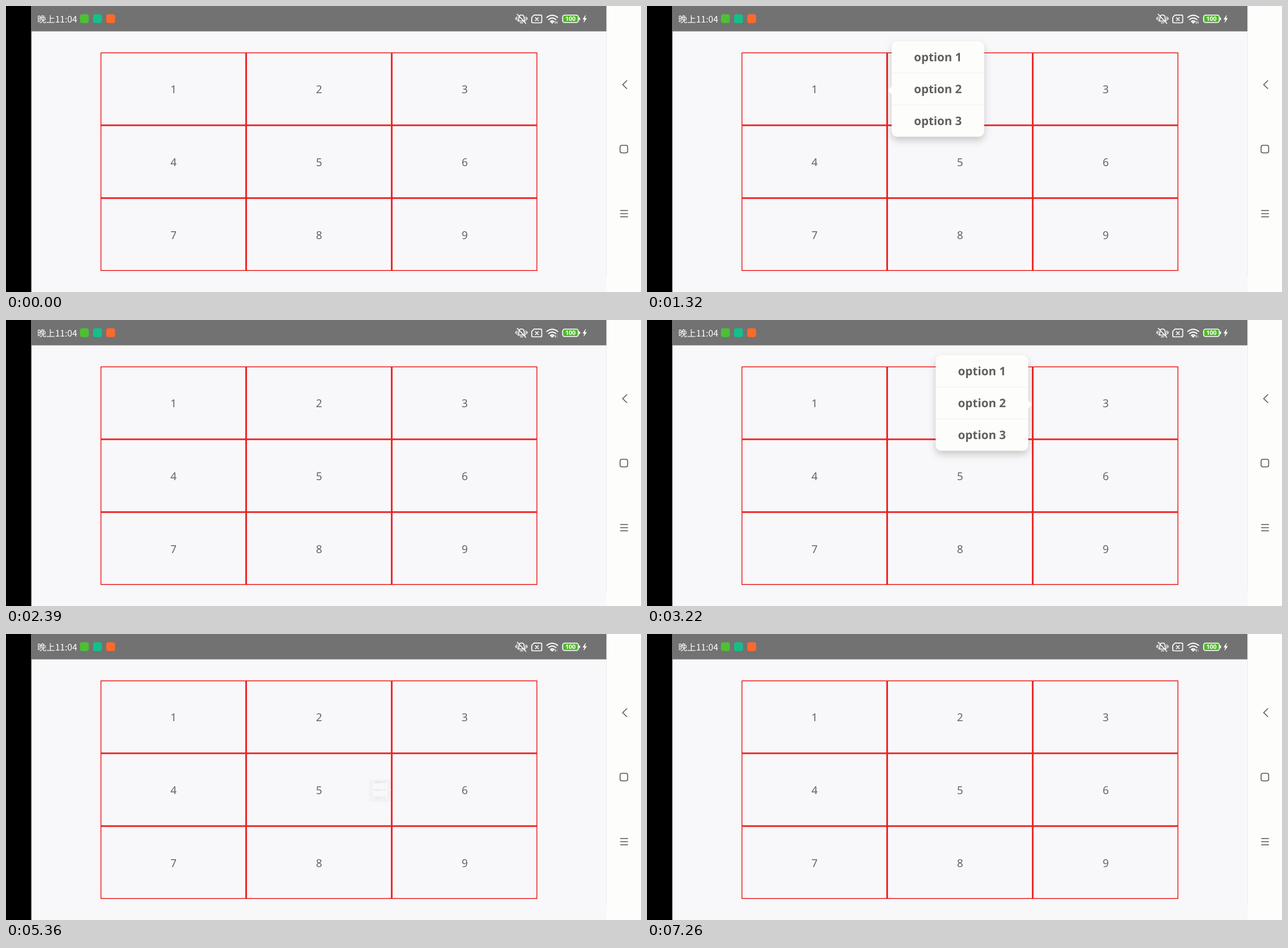
An HTML page that plays this animation: 1116 by 502 pixels, repeating every 8000 ms.

```html
<!DOCTYPE html>
<html lang="zh">
<head>
<meta charset="utf-8">
<title>Popup menu</title>
<style>
  html, body { margin: 0; width: 100%; height: 100%; overflow: hidden; background: #f8f8fa; }
  svg { display: block; }
  text { font-family: "Noto Sans", sans-serif; text-anchor: middle; text-rendering: geometricPrecision; }
  .line { fill: none; stroke-linecap: round; stroke-linejoin: round; }
  #status { stroke: #fff; stroke-width: 1.7; }
  #nav { stroke: #565656; stroke-width: 1.6; }
  #clock { font: 500 15.6px "Noto Sans CJK SC", "Noto Sans CJK", sans-serif; text-anchor: start; fill: #fff; }
  #grid text { font-size: 19px; fill: #646464; }
  #grid rect { fill: none; stroke: #ec0606; stroke-width: 1.35; }
  #card text { font-size: 20px; font-weight: 600; fill: #606060; }
</style>
</head>
<body>
<svg width="1116" height="502" viewBox="0 0 1116 502">
  <defs>
    <filter id="blur" x="-30%" y="-30%" width="160%" height="160%"><feGaussianBlur stdDeviation="6"/></filter>
    <clipPath id="ring"><path clip-rule="evenodd" d="M-40-40H200V210H-40ZM27 29H134V142H27Z"/></clipPath>
  </defs>
  <rect width="1116" height="502" fill="#f8f8fa"/>
  <rect width="44.5" height="502" fill="#000"/>
  <rect x="44.5" width="1011" height="44.5" fill="#727272"/>
  <rect x="1055.5" width="60.5" height="502" fill="#fdfdfb"/>
  <path d="M1055.5 44V476" stroke="#ececec"/>

  <text id="clock" x="55" y="28.5">晚上11:04</text>
  <rect x="130" y="14.5" width="15.5" height="15.5" rx="3.8" fill="#4fbf34"/>
  <rect x="153" y="14.5" width="15.5" height="15.5" rx="3.8" fill="#14c08a"/>
  <rect x="176.2" y="14.5" width="15.5" height="15.5" rx="3.8" fill="#fb6a2c"/>

  <g id="status" class="line">
    <path d="M900 26.5C902 24 901 22 901.5 19.5C902.5 14.5 909.500 14.500 910.500 19.500C911 22 910 24 912 26.500ZM904 29.500H908M898.500 14.500L913.500 30.500"/>
    <path d="M898 19V25M895.800 20.500V23.500M913.800 19V25M916 20.500V23.500" stroke-width="1.300"/>
    <path d="M928 15.800H939.500Q941.500 15.800 941.500 17.800V27.500Q941.500 29.500 939.500 29.500H926Q924 29.500 924 27.500V20ZM930.500 20.500L935.500 25.500M935.500 20.500L930.500 25.500"/>
    <path d="M950.500 20Q960 12.500 969.500 20M953.500 23.700Q960 18.500 966.500 23.700M957 27Q960 25 963 27L960 29.800Z" stroke-width="2.100"/>
    <path d="M965.300 30.500V27" stroke-width="1.200"/>
    <path id="traffic" d="M968.300 27V30.500" stroke-width="1.200"/>
    <rect x="978.300" y="16" width="27.500" height="13" rx="3.500" fill="#50b62c"/>
    <path d="M1008 21V24" stroke-width="1.800"/>
    <path d="M1018.500 16.500L1013.800 23.200H1016.800L1015.500 28.500L1020.300 21.700H1017.300Z" fill="#fff" stroke-width=".6"/>
  </g>
  <text x="992" y="26.300" font-size="10.500" font-weight="600" fill="#fff">100</text>

  <g id="nav" class="line">
    <path d="M1091 131L1083.800 138L1091 145M1080 359H1092.500M1080 364.500H1092.500M1080 370H1092.500"/>
    <rect x="1079.300" y="244.500" width="13.200" height="13.200" rx="3"/>
  </g>

  <g id="grid"></g>

  <g id="popup" display="none">
    <g id="body">
      <g clip-path="url(#ring)">
        <rect y="6" width="158.500" height="163.500" rx="10" fill="#000" fill-opacity=".2" filter="url(#blur)"/>
      </g>
    </g>
    <g id="face">
      <path id="arrow" d="M8-4.500L1.800 1.300Q.6 2.500 1.800 3.700L8 9.500Z" fill="#fdfdfb"/>
      <g id="card">
        <rect width="158.500" height="163.500" rx="9.500" fill="#fdfdfb"/>
        <path d="M0 54.500H158.500M0 109H158.500" stroke="#eeeff2"/>
      </g>
    </g>
  </g>
</svg>
<script>
const $ = id => document.getElementById(id);
const add = (parent, tag, attrs, text = '') => {
  const el = document.createElementNS('http://www.w3.org/2000/svg', tag);
  for (const key in attrs) el.setAttribute(key, attrs[key]);
  el.textContent = text;
  parent.append(el);
};

const LEFT = 166.2, TOP = 81.6, CELL_W = 255.85, CELL_H = 127.8;
for (let i = 0; i < 9; i++) {
  const x = LEFT + CELL_W * (i % 3), y = TOP + CELL_H * Math.floor(i / 3);
  add($('grid'), 'rect', { x: x + .68, y: y + .68, width: CELL_W - 1.36, height: CELL_H - 1.36 });
  add($('grid'), 'text', { x: x + CELL_W / 2 + .3, y: y + 71.7 }, i + 1);
}
for (let i = 0; i < 3; i++) add($('card'), 'text', { x: 79.2, y: 34.4 + 54.5 * i }, 'option ' + (i + 1));

// Opening and closing times are counted in ticks; side is where the card lies from its anchor.
const LOOP = 8000, TICK = 41.25, SPAN = 4.65;
const popups = [
  { x: 422.2, y: 145.7, side: 1, open: 29.35, close: 37.35 },
  { x: 677.7, y: 145.7, side: -1, open: 75.35, close: 101.35 },
  { x: 677.7, y: 273.6, side: -1, open: 129.7, close: 171.35 }
];
const clamp = v => Math.max(0, Math.min(1, v));
const overshoot = t => 1 + (t - 1) ** 2 * (2 * t - 1);

function draw(now) {
  const ms = now % LOOP, tick = Math.floor((ms + 3) / TICK);
  const p = popups.find(p => tick > p.open && tick < p.close + SPAN - .01);
  $('traffic').setAttribute('opacity', ms < 2387 ? 1 : .45);
  $('popup').setAttribute('display', p ? 'inline' : 'none');
  if (p) {
    const t = clamp((tick - p.open) / SPAN), left = 1 - clamp((tick - p.close) / SPAN);
    const shift = `translate(${p.side > 0 ? 7.6 : -166} -81.75)`;
    $('popup').setAttribute('transform', `translate(${p.x} ${p.y}) scale(${overshoot(t) * left})`);
    $('body').setAttribute('transform', shift);
    $('card').setAttribute('transform', shift);
    $('arrow').setAttribute('transform', `scale(${p.side} 1)`);
    for (const id of ['body', 'face']) $(id).setAttribute('opacity', Math.min(1, t * 2.5) * left);
  }
  requestAnimationFrame(draw);
}
const start = performance.now();
const loop = draw;
draw = now => loop(Math.max(0, now - start));
draw(start);
</script>
</body>
</html>
```
